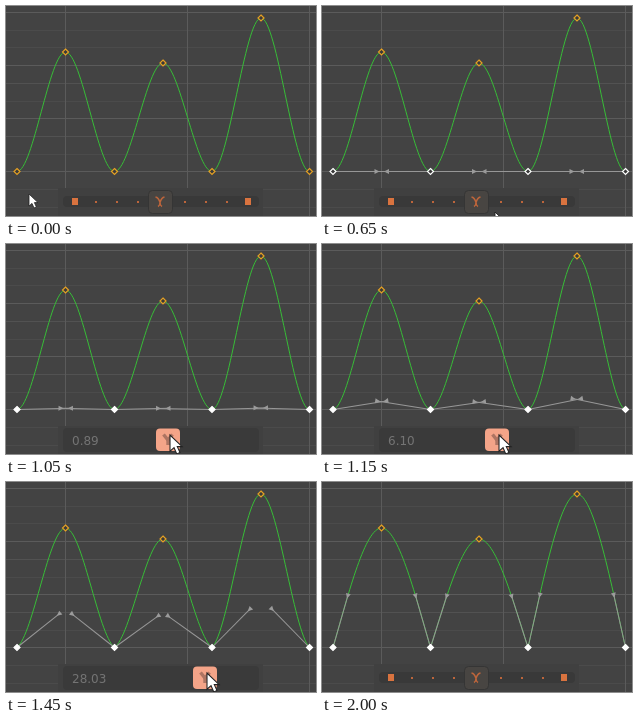
Recreate the animation shown at these times as an HTML page with a canvas. Size 310 px wide and 210 px high, loop 2100 ms.

```html
<!DOCTYPE html>
<html>
<head>
<meta charset="utf-8">
<style>
html, body { margin: 0; width: 310px; height: 210px; overflow: hidden; background: #434343; }
canvas { display: block; }
</style>
</head>
<body>
<canvas id="stage" width="310" height="210"></canvas>
<script>
const c = document.getElementById('stage').getContext('2d');
const LOOP = 2100, STEP = 50, HOME = 154, TRAVEL = 85, BASE = 165.5, HANDLE = 54;
const keys = [[11, BASE], [59.5, 46], [108.5, BASE], [157, 57], [206, BASE], [255, 12], [303.5, BASE]];

// Piecewise linear value from [time, value] pairs
function track(pts, t) {
  if (t <= pts[0][0]) return pts[0][1];
  for (let i = 1; i < pts.length; i++) {
    const [t0, a] = pts[i - 1], [t1, b] = pts[i];
    if (t <= t1) return a + (b - a) * (t - t0) / (t1 - t0);
  }
  return pts[pts.length - 1][1];
}

const thumbX = t => track([[950, 154], [1050, 162], [1150, 175], [1200, 177], [1450, 199], [1500, 208], [1650, 239]], t);

function rect(x, y, w, h, color) {
  c.fillStyle = color;
  c.fillRect(x, y, w, h);
}

function line(color, width, ...pts) {
  c.strokeStyle = color;
  c.lineWidth = width;
  c.beginPath();
  pts.forEach(([x, y]) => c.lineTo(x, y));
  c.stroke();
}

function rounded(x, y, w, h, r, fill, stroke) {
  c.beginPath();
  c.roundRect(x, y, w, h, r);
  c.fillStyle = fill;
  c.fill();
  if (stroke) {
    c.strokeStyle = stroke;
    c.lineWidth = 1;
    c.stroke();
  }
}

function grid() {
  for (let i = 0; i < 12; i++) {
    const major = i % 3 === 0;
    rect(0, Math.round(6 + i * 17.7), 310, 1, major ? '#5b5b5b' : i === 4 || i === 7 ? '#525252' : '#4b4b4b');
  }
  for (const x of [59, 181, 303]) rect(x, 0, 1, 210, '#5b5b5b');
}

// Bottom keys steepen with p, peaks stay flat
const slope = (low, peak, p) =>
  p * (1.05 + 0.37 * p) * (peak[1] - low[1]) / Math.abs(peak[0] - low[0]);

function curve(p) {
  c.strokeStyle = '#37bd37';
  c.lineWidth = 1;
  c.beginPath();
  c.moveTo(...keys[0]);
  for (let i = 1; i < keys.length; i++) {
    const a = keys[i - 1], b = keys[i], d = (b[0] - a[0]) / 3;
    const ya = i % 2 ? a[1] + d * slope(a, b, p) : a[1];
    const yb = i % 2 ? b[1] : b[1] + d * slope(b, a, p);
    c.bezierCurveTo(a[0] + d, ya, b[0] - d, yb, ...b);
  }
  c.stroke();
}

function handle(low, peak, p) {
  const side = Math.sign(peak[0] - low[0]);
  const angle = Math.atan2(slope(low, peak, p), side);
  c.save();
  c.translate(...low);
  c.rotate(angle);
  line('#979797', 1, [0, 0], [HANDLE, 0]);
  c.fillStyle = '#9b9b9b';
  c.beginPath();
  c.moveTo(HANDLE - 3, 0);
  c.lineTo(HANDLE + 2, -2.5);
  c.lineTo(HANDLE + 2, 2.5);
  c.fill();
  c.restore();
}

function diamond([x, y], color, fill) {
  c.beginPath();
  c.moveTo(x, y - 3);
  c.lineTo(x + 3, y);
  c.lineTo(x, y + 3);
  c.lineTo(x - 3, y);
  c.closePath();
  c.fillStyle = fill;
  c.fill();
  c.strokeStyle = color;
  c.lineWidth = 1.2;
  c.stroke();
}

function icon(x, color, width) {
  c.save();
  c.translate(x, 195.5);
  c.strokeStyle = color;
  c.lineWidth = width;
  c.stroke(new Path2D('M-4.5-4.5Q-1.5-4 0 1Q1.5-4 4.5-4.5M0 0V2M-2 5Q0 4 0 1Q0 4 2 5'));
  c.restore();
}

function slider(t, p, x) {
  const drag = t >= 950 && t < 1950;
  rect(52, 182, 205, 28, '#404040');
  if (drag) {
    rounded(57, 184, 196, 24, 4, '#3a3a3a');
    c.fillStyle = '#747474';
    c.font = '12px "DejaVu Sans", sans-serif';
    c.fillText((p * 100).toFixed(2), 66, 201);
    rounded(x - 12, 184.5, 24, 22.5, 4, '#f4a488');
    line('#ad7462', 3.4, [x - 4.5, 190.5], [x, 196], [x + 4.5, 190.5]);
    line('#ad7462', 3.4, [x, 195], [x, 201]);
    return;
  }
  rounded(57, 190, 196, 11, 4, '#393939');
  for (const s of [-1, 1]) {
    const mid = HOME + 1 + s * 86.5;
    rect(Math.round(mid - 3), 192, 6, 7, '#d9733f');
    for (let i = 1; i < 4; i++) rect(Math.round(HOME + s * (2.5 + 21 * i)), 195, 2, 2, '#bd653b');
  }
  const lit = t >= 750 && t < 950 || t >= 1950 && t < 2000;
  rounded(142.5, 184.5, 24, 23, 4, lit ? '#4d4a48' : '#484542', '#353535');
  icon(HOME, lit ? '#bd9885' : '#bd653b', lit ? 2.4 : 1.5);
}

function arrow(x, y, scale) {
  c.save();
  c.translate(x, y);
  c.scale(scale, scale);
  const shape = new Path2D('M0 0V12L3 9.4L5 14L7.4 13L5.4 8.6H9Z');
  c.fillStyle = '#fff';
  c.fill(shape);
  c.strokeStyle = '#222';
  c.lineWidth = 0.8;
  c.stroke(shape);
  c.restore();
}

function watch(x, y) {
  rect(x - 2.5, y - 8, 5, 16, '#111');
  rounded(x - 4, y - 4, 8, 8, 2, '#fff', '#111');
  line('#222', 1, [x, y - 2.5], [x, y + 0.5], [x - 2, y + 0.5]);
}

function marquee(t) {
  const right = track([[100, 60], [150, 200], [200, 322]], t);
  const top = track([[100, 170], [150, 155], [200, 144], [250, 141], [300, 139]], t) + 0.5;
  c.setLineDash([3, 2]);
  line('#f2f2f2', 1, [-6, top], [right, top], [right, 198.5], [-6, 198.5]);
  c.setLineDash([]);
  return [right, top];
}

function draw(t) {
  const x = thumbX(t);
  const p = t < 950 ? 0 : ((x - HOME) / TRAVEL) ** 2;
  const selected = t >= 350;
  rect(0, 0, 310, 210, '#434343');
  grid();
  curve(p);
  if (selected) keys.forEach((k, i) => {
    if (i % 2) {
      handle(keys[i - 1], k, p);
      handle(keys[i + 1], k, p);
    }
  });
  keys.forEach((k, i) => {
    const white = selected && i % 2 === 0;
    diamond(k, white ? '#fff' : '#e5a023', white && t >= 950 ? '#fff' : '#393939');
  });

  let tip;
  if (t >= 100 && t < 350) tip = marquee(t);
  slider(t, p, x);

  if (t < 50) arrow(23, 188, 1);
  else if (tip) arrow(...tip, 1);
  else if (t >= 650 && t < 850) arrow(track([[650, 173], [800, 156]], t), track([[650, 206], [800, 193]], t), 1.2);
  else if (t >= 850 && t < 950) watch(158, 201.5);
  else if (t >= 950 && t < 1650) arrow(x + 2, 191, 1.35);
}

function tick() {
  const t = performance.now() % LOOP;
  draw(Math.floor(t / STEP) * STEP);
  requestAnimationFrame(tick);
}
tick();
</script>
</body>
</html>
```
